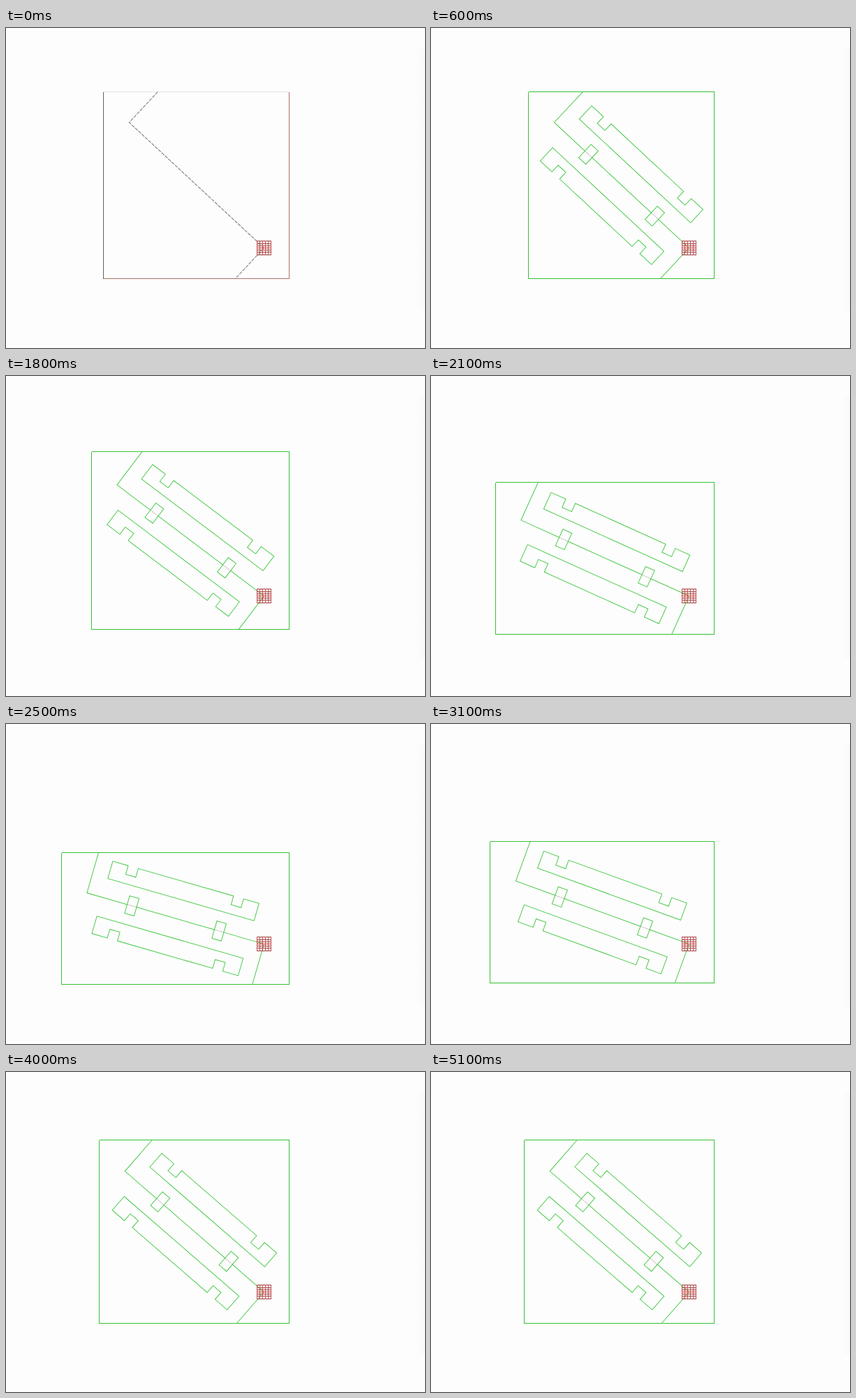
Recreate the animation shown at these times as an HTML page. Size 600 by 459 pixels, loop 5200 ms.

```html
<!DOCTYPE html>
<html lang="en">
<head>
<meta charset="utf-8">
<title>Rotating link</title>
<style>
  html, body { margin: 0; width: 100%; height: 100%; overflow: hidden; background: #fefdfe; }
  svg { display: block; width: 600px; height: 459px; }
  path { fill: none; stroke-width: 1; }
  #frame path { shape-rendering: crispEdges; }
</style>
</head>
<body>
<svg viewBox="0 0 600 459">
  <defs>
    <linearGradient id="shade">
      <stop offset="0" stop-color="#fefdfe"/>
      <stop offset="1" stop-color="#f9f9f9"/>
    </linearGradient>
  </defs>
  <rect x="588" y="30" width="12" height="375" fill="url(#shade)"/>
  <g id="frame">
    <path id="left"/><path id="top"/><path id="bottom"/><path id="right"/>
  </g>
  <g id="linkage">
    <path id="link"/>
    <path id="hidden" d="M-204 0h14M-74 0h14" stroke="#b9a9a9" stroke-dasharray="2 1"/>
    <g id="bodies" stroke="#4ccb4c">
      <path id="upper"/><path id="lower"/>
      <path d="M-204-13h14v26h-14zM-74-13h14v26h-14z"/>
    </g>
  </g>
  <g id="anchor" shape-rendering="crispEdges">
    <path id="rows" stroke="#a04848"/>
    <path id="columns" stroke="#b85050"/>
    <path d="M367.5 305v20M359 315.5h21" stroke="#e04040"/>
  </g>
</svg>
<script>
const LOOP = 5200, STEP = 100;
const PIVOT = { x: 369.5, y: 315.5 };
const LENGTH = 264, ARM = 60, MARGIN = 36.6;
const GREEN = '#4ccb4c', FRAME_GREEN = '#35c135';

// Link angle in degrees at each time in ms
const KEYS = [
  [0, 43], [1500, 43], [1800, 37.1], [2100, 24.3], [2500, 16.1], [2700, 15.3],
  [2800, 15.3], [3100, 20], [3400, 33], [4000, 41], [LOOP, 41]
];

const $ = id => document.getElementById(id);
const set = (id, name, value) => $(id).setAttribute(name, value);
const snap = v => Math.floor(v) + 0.5;

const slope = i => (KEYS[i + 1][1] - KEYS[i][1]) / (KEYS[i + 1][0] - KEYS[i][0]);

// Harmonic mean keeps the curve free of overshoot
function tangent(i) {
  if (i === 0 || i === KEYS.length - 1) return 0;
  const a = slope(i - 1), b = slope(i);
  return a * b > 0 ? 2 * a * b / (a + b) : 0;
}

function angleAt(t) {
  const i = Math.max(0, KEYS.findIndex(key => key[0] > t) - 1);
  const [t0, a] = KEYS[i], [t1, b] = KEYS[i + 1];
  const span = t1 - t0, s = (t - t0) / span, r = 1 - s;
  return a * r * r * (1 + 2 * s) + b * s * s * (3 - 2 * s)
    + span * s * r * (tangent(i) * r - tangent(i + 1) * s);
}

function bodyPath(side) {
  const inner = 28 * side, notch = 41 * side, outer = 54 * side;
  return `M-241 ${inner}V${outer}H-218V${notch}H-203V${outer}`
    + `H-61V${notch}H-46V${outer}H-23V${inner}Z`;
}

function drawFrame(angle, sketch) {
  const c = Math.cos(angle), s = Math.sin(angle);
  const left = snap(PIVOT.x - LENGTH * c - MARGIN), right = snap(PIVOT.x + MARGIN - 0.5);
  const top = snap(PIVOT.y - LENGTH * s - ARM * c), bottom = snap(PIVOT.y + ARM * c);
  const edges = {
    left: [`M${left} ${top}V${bottom}`, '#66605e'],
    top: [`M${left} ${top}H${right}`, '#e4e2e4'],
    bottom: [`M${left} ${bottom}H${right}`, '#a87468'],
    right: [`M${right} ${top}V${bottom}`, '#a87468']
  };
  for (const [id, [d, color]] of Object.entries(edges)) {
    set(id, 'd', d);
    set(id, 'stroke', sketch ? color : FRAME_GREEN);
  }
}

function render(time) {
  const t = Math.floor(time % LOOP / STEP) * STEP;
  const degrees = angleAt(t), sketch = t < 100;
  drawFrame(degrees * Math.PI / 180, sketch);
  set('linkage', 'transform', `translate(${PIVOT.x} ${PIVOT.y}) rotate(${degrees})`);
  set('link', 'd', sketch
    ? `M-${LENGTH}-${ARM}V0H0V${ARM}`
    : `M-${LENGTH}-${ARM}V0H-204M-190 0H-74M-60 0H0V${ARM}`);
  set('link', 'stroke', sketch ? '#77716c' : GREEN);
  set('link', 'stroke-dasharray', sketch ? '5 1.5' : 'none');
  set('hidden', 'visibility', sketch ? 'hidden' : 'visible');
  set('bodies', 'visibility', t < 200 ? 'hidden' : 'visible');
}

set('upper', 'd', bodyPath(-1));
set('lower', 'd', bodyPath(1));
set('rows', 'd', [305, 309, 312, 318, 321, 325].map(y => `M359 ${y + 0.5}h21`).join(''));
set('columns', 'd', [359, 363, 371, 375, 379].map(x => `M${x + 0.5} 305v21`).join(''));

const start = performance.now();
function tick() {
  render(performance.now() - start);
  requestAnimationFrame(tick);
}
tick();
</script>
</body>
</html>
```
